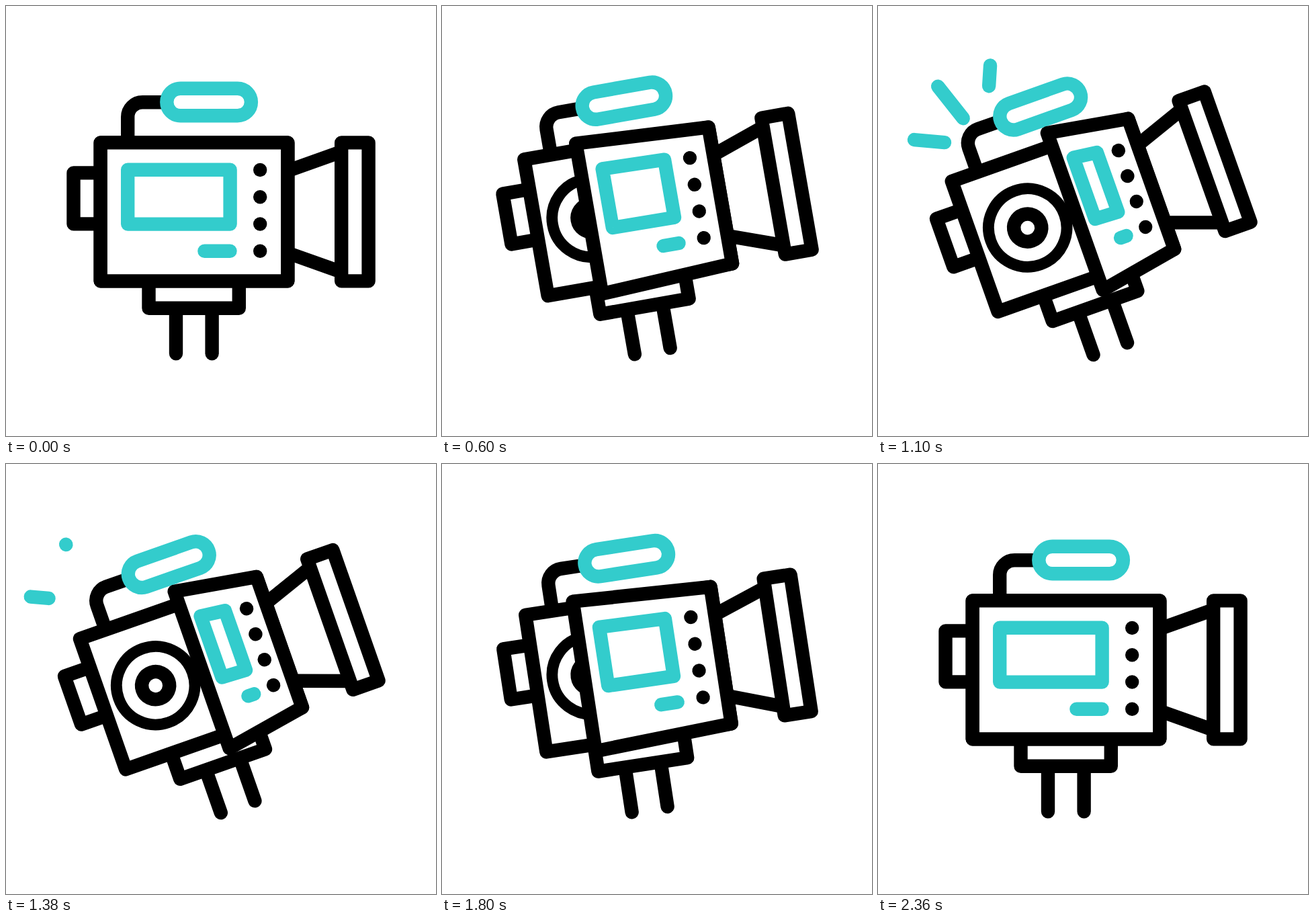
Animation of 640x640 px, one loop 2.4 s. Source, as an HTML page:

```html
<!DOCTYPE html>
<html lang="en">
<head>
<meta charset="utf-8">
<title>Camera</title>
<style>
  html, body { margin: 0; width: 100%; height: 100%; overflow: hidden; background: #fff; }
  svg { display: block; width: 100vw; height: 100vh; }
  .line { fill: none; stroke: #000; stroke-width: 20.4; stroke-linecap: round; stroke-linejoin: round; }
  .box { fill: #fff; }
  .teal { stroke: #33cccc; }
  .thin { stroke-width: 16.8; }
  .dot { fill: #000; stroke: none; }
</style>
</head>
<body>
<svg viewBox="0 0 640 640">
  <g id="flash" class="line teal"></g>
  <g id="camera" class="line"></g>
</svg>
<script>
const LOOP = 2400, TURN = 1200, BACK = 1180, MAX_ANGLE = 19.6;
const BODY = { left: 140.7, right: 419.3, top: 203.4, bottom: 409.4 };
const MID = (BODY.top + BODY.bottom) / 2;
const PIVOT = { x: 280, y: 518 };
const FAN = { x: 159.5, y: 208.5, length: 62.5 };
const camera = document.getElementById('camera');
const flash = document.getElementById('flash');

function add(parent, tag, cls, attrs = {}) {
  const el = document.createElementNS('http://www.w3.org/2000/svg', tag);
  el.setAttribute('class', cls);
  for (const name in attrs) el.setAttribute(name, attrs[name]);
  return parent.appendChild(el);
}
const part = (cls, d) => add(camera, 'path', cls, { d });
const circle = (parent, cls, cx, cy, r) => add(parent, 'circle', cls, { cx, cy, r });

// four-sided outline whose left corners lean away from the right ones
const quad = (x0, x1, top, bottom, leanTop = 0, leanBottom = 0) =>
  `M${x0} ${top + leanTop}L${x1} ${top}V${bottom}L${x0} ${bottom + leanBottom}Z`;

// camera parts, back to front
for (const side of [-1, 1]) part('', `M${279.8 + side * 26.8} 450V517.3`);
part('box', `M212.5 ${BODY.bottom}V449.8H346.8V${BODY.bottom}`);
part('', `M${BODY.left} 248.4H100.5V324.4H${BODY.left}`);
part('', `M181.2 ${BODY.top}V165.2a22 22 0 0 1 22 -22H239`);
add(camera, 'rect', 'box teal', { x: 239.3, y: 122.7, width: 125.6, height: 40.6, rx: 20.3 });
for (const side of [-1, 1]) part('', `M${BODY.right} ${MID + side * 61.1}L499.2 ${MID + side * 89.5}`);
part('box', quad(499.2, 539.6, BODY.top, BODY.bottom));
part('box', quad(BODY.left, BODY.right, BODY.top, BODY.bottom));
circle(camera, 'thin', 224, MID, 58.2);
circle(camera, '', 224, MID, 20.6);
const door = part('box', '');
const screenBox = part('teal', '');
const button = part('teal', '');
const dots = add(camera, 'g', 'dot');
for (let i = 0; i < 4; i++) circle(dots, 'dot', 378.2, 244 + i * 40.27, 10.2);

// rays fan out from one point, each a little later than the one before
const rays = [[3.6, 57.8], [-38.4, 50.8], [-84.9, 60.7]].map(([angle, inner]) => ({
  el: add(flash, 'path', '', { transform: `translate(${FAN.x} ${FAN.y}) rotate(${angle})` }),
  inner
}));

const clamp = v => Math.min(1, Math.max(0, v));
const smooth = v => { v = clamp(v); return v * v * (3 - 2 * v); };

// cubic-bezier(a, 0, 1 - a, 1)
function ease(x, a) {
  let lo = 0, hi = 1;
  for (let i = 0; i < 30; i++) {
    const s = (lo + hi) / 2, r = 1 - s;
    if (3 * r * s * (r * a + s * (1 - a)) + s * s * s < x) lo = s;
    else hi = s;
  }
  return smooth(lo);
}

function drawRay({ el, inner }, i, t) {
  const head = smooth((t - 617 - 133 * i) / 333);
  const tail = smooth((t - 933 - 133 * i) / 333);
  const on = head - tail > 0.001;
  el.style.display = on ? '' : 'none';
  el.setAttribute('d', `M0 ${-inner - FAN.length * tail}V${-inner - FAN.length * head}`);
}

function drawDoor(k) {
  door.setAttribute('d', quad(BODY.left + 158.6 * k, BODY.right, BODY.top, BODY.bottom, -20.2 * k, 21.9 * k));
  screenBox.setAttribute('d', quad(181.2 + 142.4 * k, 333.6 + 25.2 * k,
    243.8 - 8.5 * k, 324.6 + 4.7 * k, -4.5 * k, -1.6 * k));
  button.setAttribute('d', `M${295.4 + 54.3 * k} ${364.8 + 2 * k}H${333.5 + 25.1 * k}`);
  dots.setAttribute('transform', `translate(${11.7 * k} ${-0.8 * k})`);
}

function draw(t) {
  const x = clamp(t < TURN ? t / TURN : (TURN + BACK - t) / BACK);
  const angle = MAX_ANGLE * ease(x, 0.84);
  camera.setAttribute('transform',
    `translate(${3.39 * angle} ${-0.37 * angle}) rotate(${-angle} ${PIVOT.x} ${PIVOT.y})`);
  drawDoor(ease(x, 0.78));
  rays.forEach((ray, i) => drawRay(ray, i, t));
}

const start = performance.now();
function tick(now) {
  draw(Math.max(0, now - start) % LOOP);
  requestAnimationFrame(tick);
}
draw(0);
requestAnimationFrame(tick);
</script>
</body>
</html>
```
